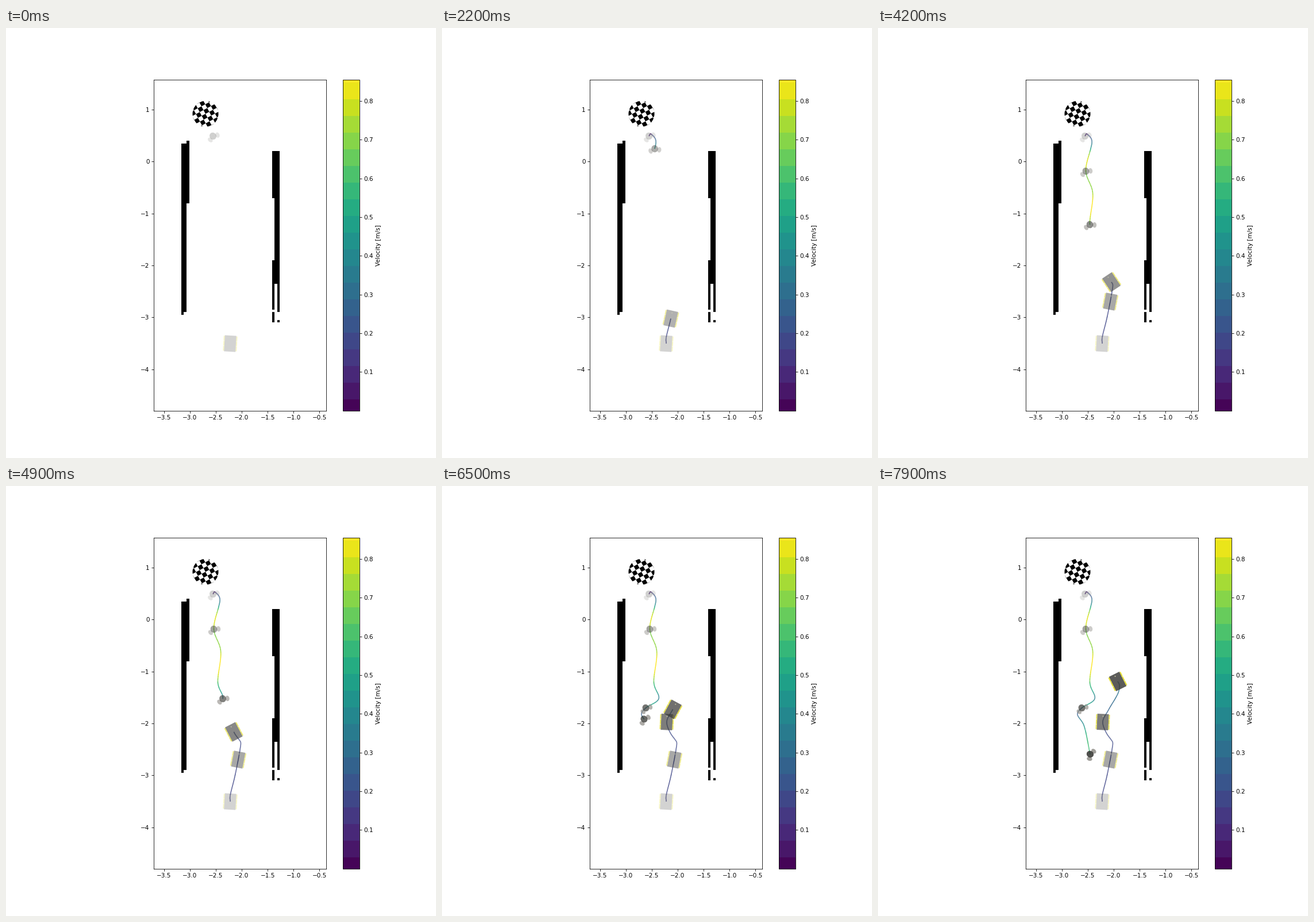
A matplotlib script for the animation above (8000 ms loop, 748x748 px).

```python
import numpy as np
import matplotlib.pyplot as plt
from matplotlib.animation import FuncAnimation
from matplotlib.cm import ScalarMappable
from matplotlib.collections import LineCollection
from matplotlib.colors import ListedColormap, Normalize
from matplotlib.patches import Circle, Ellipse, Rectangle
from matplotlib.transforms import Affine2D

SIZE, FRAMES, STEP, TICK = 748, 80, 100, 20
PX_PER_M = 90.27
SNAPSHOT_GAP = 2800
NORM = Normalize(0.0002, 0.855)
VIRIDIS = plt.get_cmap("viridis")
CLOCK = np.arange(0, FRAMES * STEP, TICK)


def spline(*keys):
    """Smooth x, y over CLOCK through (ms, x, y) key points."""
    keys = np.array(keys)
    times, pos = keys[:, 0], keys[:, 1:]
    slopes = np.gradient(pos, times, axis=0)
    i = np.clip(np.searchsorted(times, CLOCK, "right") - 1, 0, len(times) - 2)
    h = (times[i + 1] - times[i])[:, None]
    u = (CLOCK - times[i])[:, None] / h
    return ((2 * u**3 - 3 * u**2 + 1) * pos[i]
            + (u**3 - 2 * u**2 + u) * h * slopes[i]
            + (3 * u**2 - 2 * u**3) * pos[i + 1]
            + (u**3 - u**2) * h * slopes[i + 1])


def rgb(r, g, b):
    return r / 255, g / 255, b / 255


def robot_parts():
    yield Rectangle((-10, -14), 20, 28, fc=rgb(55, 55, 52))
    for x in (-12, 10):
        for y in (-13, -4.2, 4.6):
            yield Rectangle((x, y), 2, 8.2, fc=rgb(222, 215, 0))
    yield Circle((0, -10), 1, fc=rgb(225, 225, 180))


def walker_parts():
    for side in (-1, 1):
        yield Ellipse((side * 7.6, 3), 7, 9.5, angle=side * 15,
                      fc=rgb(140, 138, 132))
    yield Ellipse((0, 0), 11.5, 12.5, fc=rgb(42, 42, 38))


# Walker: colour follows its real speed
walk = spline((0, 360, 188), (1000, 364, 184.5), (1950, 372, 201),
              (2200, 370, 210), (2800, 361.5, 249), (3400, 373.3, 285),
              (4200, 368.5, 342), (4900, 377, 370), (5600, 354.5, 386),
              (6100, 347, 396), (6850, 358, 416), (7900, 369, 466.5))
vx, vy = np.gradient(walk, TICK / 1000, axis=0).T
walk_speed = np.hypot(vx, vy) / PX_PER_M
walk_turn = np.interp(CLOCK, [0, 2200, 2800, 4200, 7900],
                      [-34, -8, -25, -17, -61])

# Robot: faces along its path
drive = spline((0, 390, 549), (1400, 391, 533.5), (2200, 398, 505.5),
               (3200, 407, 459), (3800, 408.3, 446), (4200, 406, 442),
               (4800, 397.5, 430), (5600, 391, 410.5), (6500, 401.5, 388.5),
               (7200, 418.5, 358), (7600, 420, 346), (7900, 417, 340))
vx, vy = np.gradient(drive, axis=0).T
drive_turn = np.degrees(np.arctan2(vx, -vy))
drive_speed = np.interp(CLOCK, [0, 5600, 7200], [0.17, 0.2, 0.33])

fig = plt.figure(figsize=(10, 10), dpi=SIZE / 10, facecolor="white")
ax = fig.add_subplot()
ax.set(xlim=(-3.696, -0.368), ylim=(-4.8, 1.581), aspect="equal",
       xticks=np.arange(-3.5, -0.4, 0.5), yticks=range(-4, 2))

# Colour scale in flat steps
rows = np.arange(576)
steps = np.clip((rows - 20) // 29 * 29 + 34.5, 0, 575) / 575
scale = ScalarMappable(NORM, ListedColormap(VIRIDIS(steps)))
fig.colorbar(scale, ax=ax, label="Velocity [m/s]", ticks=np.arange(1, 9) / 10)

# Walls on a 5 cm grid: first column, bottom row, columns, rows
grid = Affine2D().scale(0.05).translate(-3.163, 0) + ax.transData
for col, row, w, h in [(0, -58, 2, 65), (0, -59, 1, 1), (2, -16, 1, 24),
                       (36, -47, 2, 51), (35, -14, 1, 18), (35, -57, 1, 19),
                       (37, -58, 1, 11), (35, -62, 1, 4), (37, -62, 1, 1)]:
    ax.add_patch(Rectangle((col, row), w, h, fc="black", lw=0, snap=True,
                           transform=grid))

# Pixel coordinates with y pointing down
stage = Affine2D().scale(1 / SIZE, -1 / SIZE).translate(0, 1) + fig.transFigure

# Checkered goal disc
disc = Circle((347, 149.3), 22.5, transform=stage)
tilt = Affine2D().rotate_deg(-28).translate(347, 149.3) + stage
CELL = 7.4
for i in range(-4, 4):
    for j in range(-4, 4):
        if (i + j) % 2:
            square = ax.add_patch(Rectangle((i * CELL, j * CELL), CELL, CELL,
                                            fc="black", lw=0, transform=tilt))
            square.set_clip_path(disc)

actors = []
for parts, path, turn, speed in ((robot_parts, drive, drive_turn, drive_speed),
                                 (walker_parts, walk, walk_turn, walk_speed)):
    trail = LineCollection([], cmap=VIRIDIS, norm=NORM, linewidths=1.5,
                           transform=stage, zorder=2)
    ax.add_collection(trail, autolim=False)
    actors.append((trail, parts, path, turn, speed))

sprites = []


def place(parts, path, turn, t):
    k = t // TICK
    pose = Affine2D().rotate_deg(turn[k]).translate(*path[k]) + stage
    for part in parts():
        part.set(alpha=0.22 + 0.076 * t / 1000, linewidth=0, zorder=3,
                 transform=pose)
        sprites.append(ax.add_patch(part))


def draw(frame):
    now = frame * STEP
    while sprites:
        sprites.pop().remove()
    for trail, parts, path, turn, speed in actors:
        done = path[:now // TICK + 1]
        trail.set_segments(np.stack([done[:-1], done[1:]], axis=1))
        trail.set_array(speed[:len(done) - 1])
        for t in [*range(0, now, SNAPSHOT_GAP), now]:
            place(parts, path, turn, t)
    return []


anim = FuncAnimation(fig, draw, frames=FRAMES, interval=STEP,
                     init_func=lambda: [], repeat=True, repeat_delay=0)
plt.show()
```
